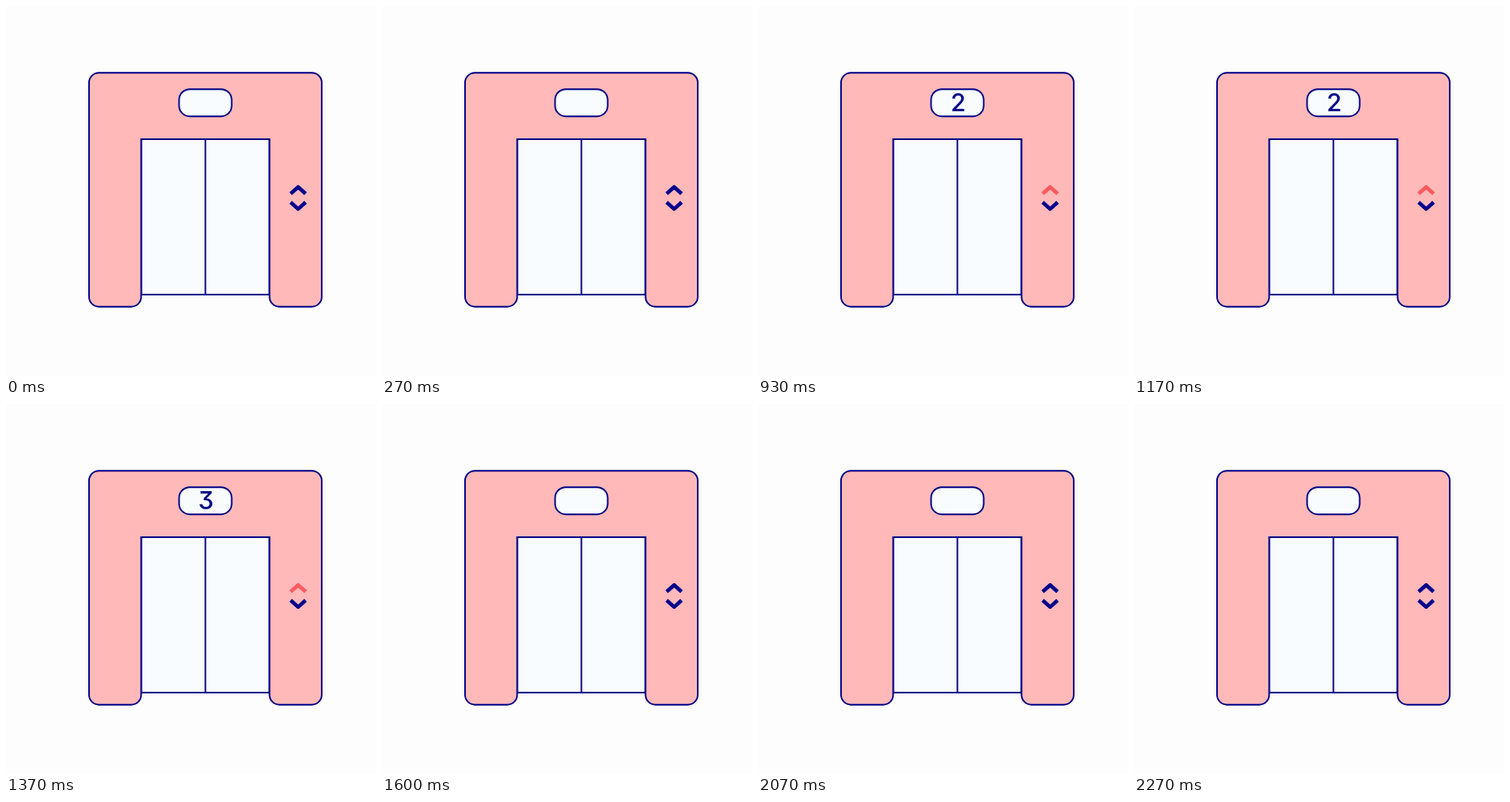
An HTML page for the animation above (2.31 s loop, 450x450 px).

```html
<!DOCTYPE html>
<html lang="en">
<head>
<meta charset="utf-8">
<title>Elevator</title>
<style>
  html, body { margin: 0; width: 100%; height: 100%; overflow: hidden; background: #fdfdfd; }
  svg { display: block; width: 100vw; height: 100vh; }
  .line { stroke: #000085; stroke-width: 1.9; }
  .wall { fill: #ffb9b9; }
  .panel { fill: #f9fcff; }
  .arrow { fill: none; stroke: #00008b; stroke-width: 4.6; stroke-linejoin: round; }
  #floor {
    font: 450 30px Inter, sans-serif;
    font-feature-settings: "cv09";
    text-anchor: middle;
    fill: #000085;
  }
</style>
</head>
<body>
<svg viewBox="0 0 450 450">
  <rect class="line panel" x="164.4" y="162" width="156.1" height="189"/>
  <path class="line" d="M242.5 162V351"/>
  <path class="line wall" d="M113 81.2H372A12 12 0 0 1 384 93.2V353.7A12 12 0 0 1 372 365.7H332.5
    A12 12 0 0 1 320.5 353.7V162H164.4V353.7A12 12 0 0 1 152.4 365.7H113A12 12 0 0 1 101 353.7V93.2A12 12 0 0 1 113 81.2Z"/>
  <rect class="line panel" x="210.5" y="101.2" width="64" height="33" rx="13"/>
  <text id="floor" y="128.3"></text>
  <path id="up" class="arrow" d="M346.2 228.3L355.3 220.2L364.4 228.3"/>
  <path class="arrow" d="M346.2 238.8L355.3 246.9L364.4 238.8"/>
</svg>
<script>
  const LOOP = 2310;
  const NAVY = "#00008b", LIT = "#fa5a60";
  const steps = [
    { at: 0, floor: "", x: 243 },
    { at: 470, floor: "1", x: 243 },
    { at: 830, floor: "2", x: 243.5 },
    { at: 1200, floor: "3", x: 243.3 },
    { at: 1600, floor: "", x: 243 }
  ];
  const floor = document.getElementById("floor");
  const up = document.getElementById("up");

  function draw(now) {
    const time = now % LOOP;
    const step = steps.filter(s => s.at <= time).pop();
    floor.textContent = step.floor;
    floor.setAttribute("x", step.x);
    up.style.stroke = step.floor ? LIT : NAVY;
  }

  const start = performance.now();
  function tick() {
    draw(performance.now() - start);
    requestAnimationFrame(tick);
  }
  tick();
</script>
</body>
</html>
```
